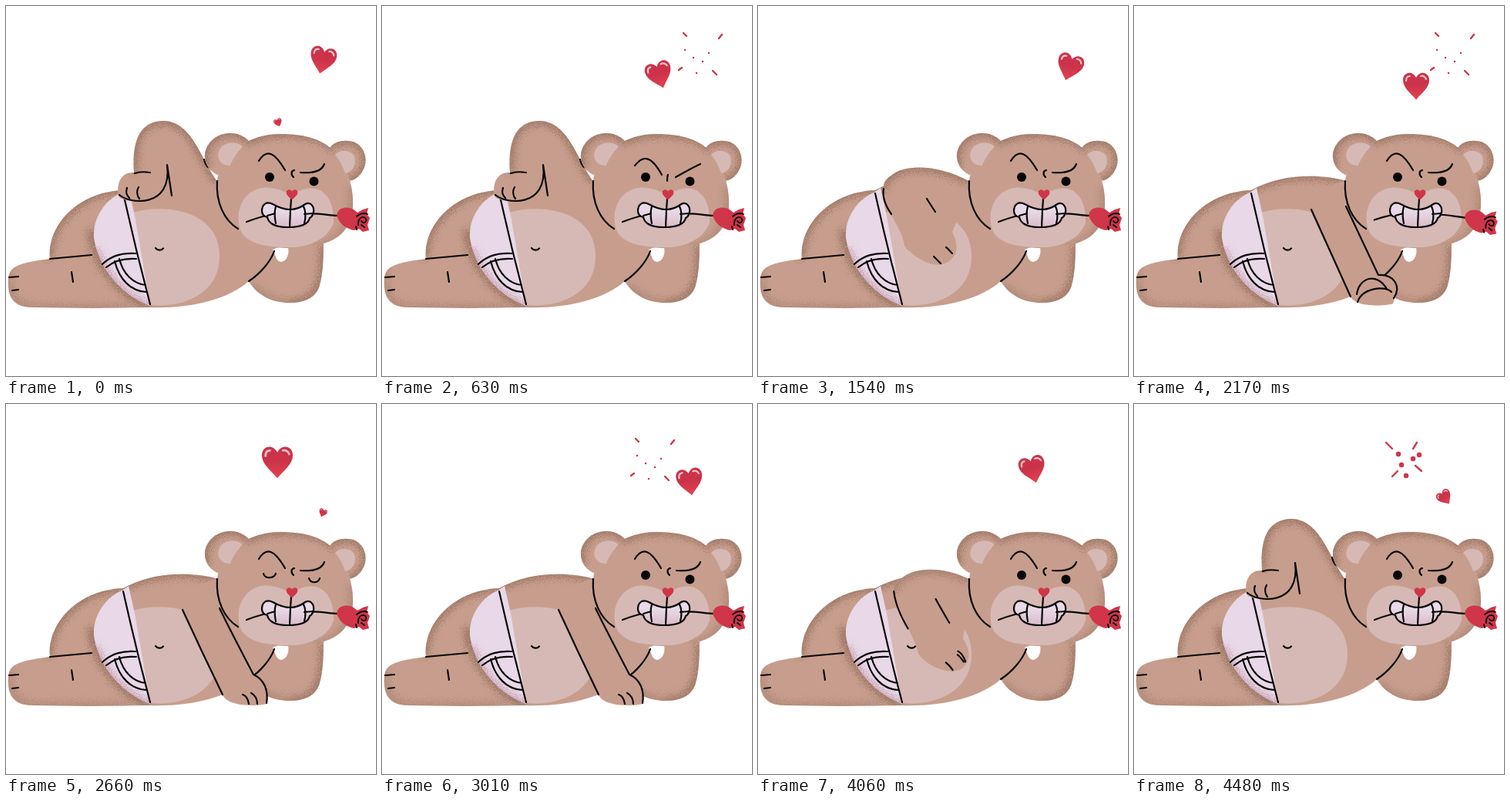
Write an HTML page that moves like this. It is 480 by 480 pixels and loops after 4550 ms.

```html
<!DOCTYPE html>
<html lang="en">
<head>
<meta charset="utf-8">
<title>Bear with a rose</title>
<style>
  html, body { margin: 0; width: 100%; height: 100%; overflow: hidden; background: #fff; }
  svg { display: block; width: 100vw; height: 100vh; }
  .fur { fill: #c79e8d; }
  .pale { fill: #d6b9b4; }
  .cloth { fill: #e9d8e7; }
  .red { fill: #d0354a; }
  .ink { fill: none; stroke: #080606; stroke-width: 2.2; stroke-linecap: round; stroke-linejoin: round; }
  .shade { fill: none; stroke: #8d6756; stroke-width: 11; opacity: .68; filter: url(#grain); }
  .faint { opacity: .35; }
  .spark { fill: none; stroke: #d0354a; stroke-linecap: round; }
</style>
</head>
<body>
<svg viewBox="0 0 480 480">
  <defs>
    <filter id="grain" filterUnits="userSpaceOnUse" x="0" y="0" width="480" height="480">
      <feGaussianBlur stdDeviation="3.5" result="soft"/>
      <feTurbulence type="fractalNoise" baseFrequency=".8" numOctaves="2" seed="4"/>
      <feDisplacementMap in="soft" scale="26" xChannelSelector="R" yChannelSelector="G"/>
    </filter>
    <linearGradient id="heartFill" x1="0" y1="0" x2="0" y2="1">
      <stop offset=".45" stop-color="#cb334a"/><stop offset="1" stop-color="#e5424f"/>
    </linearGradient>
    <linearGradient id="teethFill" x1="0" y1="0" x2="0" y2="1">
      <stop offset=".35" stop-color="#e9d8e7"/><stop offset="1" stop-color="#d8bcc8"/>
    </linearGradient>
    <path id="heartShape" d="M0,18.500 C-8,9 -17,3 -17,-7 C-17,-17 -5,-20 0,-10 C5,-20 17,-17 17,-7 C17,3 8,9 0,18.500Z"/>
    <g id="heart">
      <use href="#heartShape" fill="url(#heartFill)"/>
      <path d="M-13,-6 C-13,-10 -11,-12 -8,-12 M6,-12 C9,-13 12,-11 13,-8" fill="none" stroke="#f4c3c9" stroke-width="2.2" stroke-linecap="round"/>
    </g>
    <path id="bodyShape" d="M3,354 C4,337 18,333 57,328 C53,285 93,241 152,239 C190,218 240,217 275,227 L330,270 L412,300 C412,320 412,345 407,362 C402,380 385,385 368,385 C345,385 325,375 315,357 C287,382 235,393 187,391 L110,392 L35,391 C12,391 1,380 3,354Z"/>
    <path id="briefShape" d="M152,241 L159,237 C162,262 172,320 187,389 C150,375 122,342 115,306 C110,282 124,253 152,241Z"/>
    <path id="headShape" d="M274,226 C278,190 315,166 357,166 C400,166 425,180 438,205 C446,222 451,240 450,260 C448,295 425,313 370,314 C325,314 303,305 301,289 C283,278 272,255 274,226Z"/>
    <path id="earLShape" d="M274,219 C262,213 257,203 258,191 C261,174 277,164 293,165 C306,166 313,172 317,178 L290,215Z"/>
    <path id="earRShape" d="M420,184 C427,174 442,173 453,177 C465,183 469,198 465,209 C461,220 452,227 443,227Z"/>
    <clipPath id="inBody"><use href="#bodyShape"/></clipPath>
    <clipPath id="inBrief"><use href="#briefShape"/></clipPath>
    <clipPath id="inHead"><use href="#headShape"/></clipPath>
    <clipPath id="inEarL"><use href="#earLShape"/></clipPath>
    <clipPath id="inEarR"><use href="#earRShape"/></clipPath>
    <clipPath id="inArm"><path id="armClip"/></clipPath>
  </defs>

  <g id="body">
    <use href="#bodyShape" class="fur"/>
    <g clip-path="url(#inBody)">
      <path class="shade" d="M55,328 C53,285 93,240 152,238 C190,217 240,216 276,226"/>
      <path class="shade" d="M412,310 C413,350 410,386 368,386"/>
      <path class="shade faint" d="M2,338 C-1,365 5,392 40,392 L160,393 M368,386 C345,386 330,377 318,362"/>
      <path class="shade" d="M112,290 C114,325 140,365 186,390" style="stroke-width:14"/>
    </g>
    <path fill="#fff" d="M346,316 C352,312 360,312 366,313 C368,324 363,331 357,332 C350,331 350,324 346,316Z"/>
    <path class="pale" d="M164,268 C205,256 277,264 277,325 C277,370 235,392 187,388Z"/>
    <use href="#briefShape" class="cloth"/>
    <g clip-path="url(#inBrief)">
      <path class="shade" style="stroke:#b88a9b" d="M115,315 C125,350 155,380 188,391"/>
    </g>
    <path class="cloth" d="M141,331 C147,355 162,370 182,371 L181,362 C165,360 152,348 147,328Z"/>
    <path class="cloth" d="M152,241 L159,236 L167,272 L187,388Z"/>
    <path class="ink" d="M152,243 Q168,315 187,387 M125,335 C137,323 152,320 168,321 M130,339 C142,329 155,327 169,328 M141,331 C147,355 162,370 182,371 M147,328 C152,348 165,360 181,362"/>
    <path class="ink" d="M57,328 L111,323 M4,352 L16,351 M8,369 L16,368 M85,345 L87,358 M194,314 C197,317.500 201,317.500 204,314.500 M348,318 C343,332 330,347 315,357"/>
  </g>

  <g id="arm">
    <path id="armFill" class="fur"/>
    <g clip-path="url(#inArm)"><path id="armShade" class="shade"/></g>
    <path id="armInk" class="ink"/>
    <path id="shoulderInk" class="ink" d="M257,199 C258,203 259,206 262,209"/>
  </g>

  <g id="head">
    <use href="#earLShape" class="fur"/>
    <g clip-path="url(#inEarL)"><path class="shade" d="M262,210 C256,203 256,198 258,190 C262,173 277,163 293,164 C306,165 313,171 317,177"/></g>
    <use href="#earRShape" class="fur"/>
    <g clip-path="url(#inEarR)"><path class="shade" d="M420,183 C427,173 442,172 454,176 C466,182 470,198 466,209 C462,221 452,228 443,228"/></g>
    <use href="#headShape" class="fur"/>
    <g clip-path="url(#inHead)">
      <path class="shade" d="M310,177 C345,158 405,162 429,187"/>
      <path class="shade faint" d="M449,235 C453,275 440,308 400,315"/>
    </g>
    <path class="pale" d="M291,207 C279,207 273,198 276,189 C280,177 296,174 307,182 C300,190 294,198 291,207Z"/>
    <path class="pale" d="M427,193 C434,185 448,187 452,195 C455,206 450,215 440,217 C437,208 433,200 427,193Z"/>
    <path class="ink" d="M274,227 C272,255 283,278 301,289"/>
    <path class="pale" d="M302,280 C299,254 317,235 338,235.500 C352,236 362,241 370,246 C380,238 392,235 402,237 C419,241 426,262 425,280 C420,300 395,314 365,313 C330,313 302,305 302,280Z"/>
    <path id="browInk" class="ink"/>
    <g id="eyesOpen" fill="#080606"><circle cx="342" cy="222" r="6"/><circle cx="399.500" cy="227.500" r="6"/></g>
    <path id="eyesShut" class="ink" d="M334,220 C336,227 347,227 350,220 M393,226 C395,233 405,233 407,226"/>
    <path class="ink" d="M370,250 L369,264"/>
    <use href="#heartShape" class="red" transform="translate(371 244.500) scale(.43 .39)"/>
    <g id="rose">
      <path class="ink" d="M312,280 C325,275 338,271 350,270 M386,270 C400,268 415,271 430,272"/>
      <path class="red" d="M429,272 C430,263 438,260 446,262 C451,263 453,266 456,268 L463,264 L470,262 L468,270 L472,275 L469,284 L471,291 L463,293 L458,289 L451,291 C440,288 433,283 429,272Z"/>
      <path class="ink" d="M455,273 C459,269 465,268 469,270 M457,284 C456,276 462,272 466,275 C470,279 464,284 461,279 M461,284 L465,287 M454,286 L455,290" style="stroke-width:1.900"/>
    </g>
    <path class="ink" style="fill:url(#teethFill)" d="M332,266 C332,257 338,253 346,257 C353,261 360,264 369,264 C377,264 383,261 389,256.500 C396,254 400,261 399,267 C398,272 396,274 394,275 C392,284 381,287 366,287 C350,287 341,283 339,274 C335,273 332,271 332,266Z"/>
    <path class="ink" d="M350,260 C348,267 348,273 350,282 M369,264 L368,287 M386,260 C389,266 389,274 387,282 M339,272 L349,269 M387,270 L398,269"/>
  </g>

  <g id="hearts"></g>
</svg>
<script>
const STEP = 70, COUNT = 65, BEAT = 24;
const $ = id => document.getElementById(id);
const set = (el, attrs) => { for (const k in attrs) el.setAttribute(k, attrs[k]); };
const show = (el, on) => set(el, { visibility: on ? 'visible' : 'hidden' });
const clamp = x => Math.max(0, Math.min(1, x));

// Blends two path strings that share the same commands.
const NUM = /-?\d+(?:\.\d+)?/g;
function mix(a, b, t) {
  const ends = b.match(NUM);
  let i = 0;
  return a.replace(NUM, n => (+n + (ends[i++] - n) * t).toFixed(2));
}

// Finds the surrounding keys [time, value] and the fraction between them.
function span(keys, x) {
  let i = 0;
  while (i < keys.length - 2 && x >= keys[i + 1][0]) i++;
  const [a, b] = [keys[i], keys[i + 1]];
  return [a[1], b[1], clamp((x - a[0]) / (b[0] - a[0]))];
}
function at(keys, x) {
  const [a, b, t] = span(keys, x);
  return a + (b - a) * t;
}

// Ink order: outer edge, inner edge, two fingers, side of the hand.
const hip = {
  shade: 1,
  fill: 'M275,228 C255,205 243,150 205,149 C168,149 164,185 166,216 C148,215 143,232 146,247 C155,256 195,258 208,238 C215,246 230,246 245,245 L275,240Z',
  ink: 'M167,217 C172,215 180,215 187,216 M209,206 C211,219 213,232 215,246 M157,236 C155,241 157,246 160,249 M172,235 C169,240 170,246 173,250 M147,245 C160,257 216,263 209,206'
};
const pat = {
  shade: 1,
  fill: 'M275,228 C235,205 190,205 174,219 C165,225 162,230 163,238 C160,262 187,285 190,311 C205,330 233,343 248,331 C262,321 258,305 252,293 L275,240Z',
  ink: 'M163,237 C161,248 166,260 173,270 M219,250 C222,255 226,261 230,267 M228,325 C231,328 234,331 237,334 M244,313 C247,315 249,318 252,321 M244,313 C247,315 249,318 252,321'
};
const fist = {
  shade: 0,
  fill: 'M275,228 C262,226 245,240 235,255 C228,260 228,264 230,268 C247,305 265,342 281,377 C287,392 330,389 336,386 C343,370 341,350 317,348 L275,260Z',
  ink: 'M230,264 C247,302 264,340 281,377 M275,260 C289,290 303,319 317,349 M290,384 C296,366 325,362 334,371 M289,374 C292,352 315,345 328,367 M317,349 C338,348 347,364 337,379'
};
const rest = {
  shade: 0,
  fill: 'M275,228 C262,226 245,240 235,255 C228,262 228,264 230,268 C247,305 265,342 281,377 C287,394 330,392 337,389 C342,372 337,358 321,351 L277,265Z',
  ink: 'M229,267 C246,304 263,340 281,377 M277,265 C291,294 306,322 321,351 M307,377 C311,378 314,383 315,389 M318,375 C323,377 326,383 326,389 M321,351 C334,357 341,370 338,388'
};
const ARM = [[0, hip], [18, hip], [22, pat], [29, fist], [31, fist], [34, rest], [54, rest], [59, pat], [63, hip], [65, hip]];

const CALM = 'M328,201 C338,185 348,189 362,213 M382,216 C395,217 409,216 413,205 M374,213 C370,214 369,218 373,222';
const CROSS = 'M328,207 C339,193 349,194 363,219 M381,222 C392,216 402,210 413,205 M371,219 C370,221 370,224 370,227';
const BROW = [[0, 0], [5, 0], [8, 1], [11, 1], [14, 0]];
const ROSE = [[27, 0], [31, 2.5], [35, 0]];

// One heart's life in steps: height, sideways sway, tilt and size.
const RISE = [[1, 0], [3, -20], [7, -48], [9, -62.5], [11, -71.5], [12, -76.5], [14, -76.5]];
const SWAY = [[1, 0], [3, -8], [7, -13], [9, -6.5], [11, 0], [12, 2], [14, 1]];
const TILT = [[1, 22], [3, -35], [7, 0], [9, 17], [11, 12], [12, 0]];
const SIZE = [[1, .31], [3, .56], [6, 1], [12, 1], [14, 1.18]];
const RAYS = ['M-24,-24 L-16,-16 M16,-24 L11,-16 M-16,20 L-9,13 M14,6 L22,13', 'M-22,-29 L-18,-25 M28,-27 L24,-22 M-28,19 L-24,16 M16,20 L21,25'];
const DOTS = ['M-8,-9 L-8,-9 M11,-3 L11,-3 M19,-8 L19,-8 M-4,5 L-4,5 M2,19 L2,19', 'M-20,-7 L-20,-7 M-9,3 L-9,3 M11,-3 L11,-3 M3,8 L3,8 M-5,23 L-5,23'];

function add(tag, attrs, parent) {
  const el = document.createElementNS('http://www.w3.org/2000/svg', tag);
  set(el, attrs);
  return parent.appendChild(el);
}
function makeHeart(x, y, side, delay) {
  const burst = add('g', { transform: `translate(${x + side * 2} ${y - 77})` }, $('hearts'));
  const rays = add('path', { class: 'spark' }, burst);
  const dots = add('path', { class: 'spark' }, burst);
  const heart = add('use', { href: '#heart' }, $('hearts'));
  return phase => {
    const u = (phase + delay) % BEAT;
    show(heart, u <= 15);
    show(burst, u >= 16 && u <= 20);
    set(heart, { transform: `translate(${x + side * at(SWAY, u)} ${y + at(RISE, u)}) rotate(${side * at(TILT, u)}) scale(${at(SIZE, u)})` });
    const t = clamp((u - 16) / 2);
    set(rays, { d: mix(...RAYS, t), 'stroke-width': 2.4 });
    set(dots, { d: mix(...DOTS, t), 'stroke-width': 6.5 - 4 * t });
  };
}
const hearts = [makeHeart(411, 141, 1, 11), makeHeart(353, 151, -1, 0)];

function draw(step) {
  const [from, to, t] = span(ARM, step);
  const fill = mix(from.fill, to.fill, t);
  set($('armFill'), { d: fill });
  set($('armClip'), { d: fill });
  set($('armInk'), { d: mix(from.ink, to.ink, t) });
  set($('armShade'), { d: fill.split(' C').slice(0, 3).join(' C') });
  $('armShade').style.opacity = .68 * (from.shade + (to.shade - from.shade) * t);
  show($('shoulderInk'), step < 19 || step > 61);

  set($('browInk'), { d: mix(CALM, CROSS, at(BROW, step)) });
  const shut = step >= 37 && step <= 40;
  show($('eyesOpen'), !shut);
  show($('eyesShut'), shut);
  set($('rose'), { transform: `rotate(${at(ROSE, step)} 369 271)` });
  hearts.forEach(move => move(step % BEAT));
}

let start, last;
function tick(now) {
  start ??= now;
  const step = Math.floor((now - start) / STEP) % COUNT;
  if (step !== last) draw(last = step);
  requestAnimationFrame(tick);
}
draw(0);
requestAnimationFrame(tick);
</script>
</body>
</html>
```
